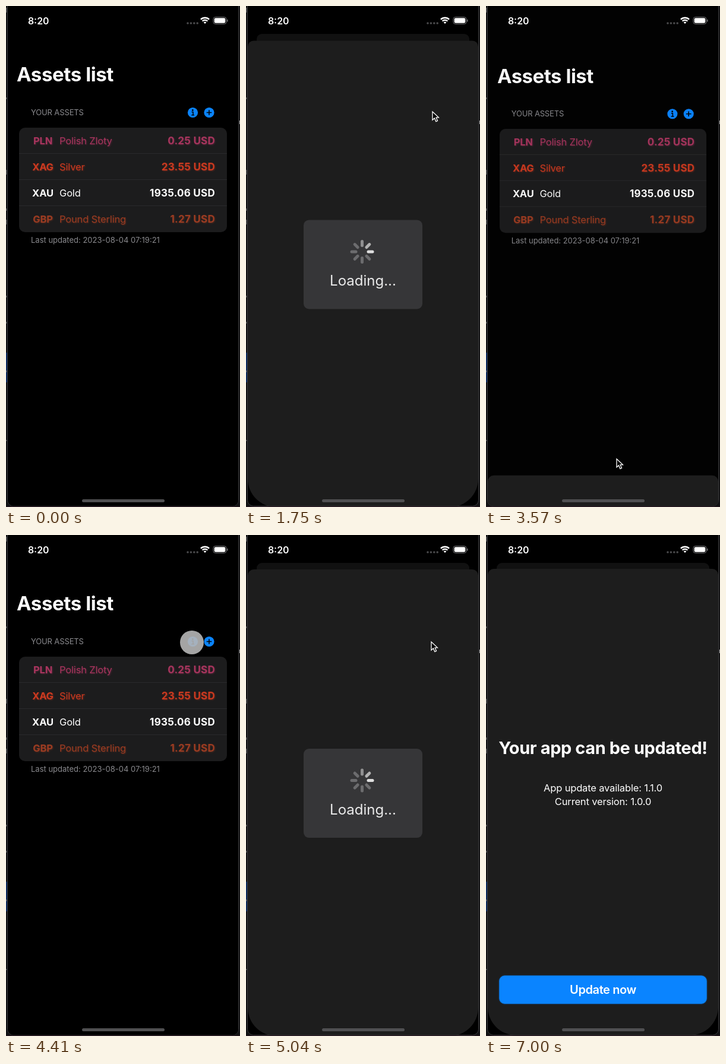
Write an HTML page that moves like this. It is 394 by 844 pixels and loops after 8000 ms.

```html
<!DOCTYPE html>
<html lang="en">
<head>
<meta charset="utf-8">
<title>Assets list</title>
<style>
  html, body { margin: 0; width: 100%; height: 100%; overflow: hidden; background: #000; }
  svg { display: block; width: 394px; height: 844px; }
  text { font-family: Inter, "Liberation Sans", sans-serif; fill: #fff; white-space: pre; }
  .title { font-size: 33px; font-weight: 700; letter-spacing: -.0125em; }
  .note { font-size: 13px; fill: #8a8a8e; }
  .body { font-size: 16.5px; letter-spacing: -.01em; }
  .code { font-size: 16.5px; font-weight: 700; letter-spacing: -.01em; }
  .price { font-size: 17px; font-weight: 700; letter-spacing: .015em; }
  .button { font-size: 20px; font-weight: 600; letter-spacing: -.02em; }
  .mid { text-anchor: middle; }
  .end { text-anchor: end; }
  #press { fill: #0a84ff; filter: drop-shadow(0 .5px 1px #0a84ff88); }
  #touch { fill: #c8c8c8; fill-opacity: .82; filter: drop-shadow(0 0 1px #0008); }
</style>
</head>
<body>
<svg viewBox="0 0 394 844">
  <clipPath id="screen"><rect x="3" y="-20" width="388.5" height="862.5" rx="10"/></clipPath>

  <!-- desktop behind the phone -->
  <rect width="394" height="844" fill="#121214"/>
  <rect y="584" width="3" height="50" fill="#0c2a5e"/>
  <path d="M.5 3v8M.5 154v3M.5 276v8M.5 341v4M.5 360v8M.5 488v3M.5 532v3M.5 614v3M.5 731v2" stroke="#666" stroke-width="1.5"/>
  <path d="M393.5 193v6" stroke="#bbb"/>
  <rect y="843" width="394" height="1" fill="#2a1620"/>
  <rect x="2.5" y="-20" width="389" height="862.5" rx="10" fill="#000" stroke="#3a3a3c"/>

  <g clip-path="url(#screen)">
    <g id="base">
      <rect id="back" x="3" width="388" height="844" rx="10"/>
      <text class="title" x="18" y="127">Assets list</text>
      <text class="note" x="42" y="184" letter-spacing="-.13">YOUR ASSETS</text>
      <circle id="info" cx="314.5" cy="179.5" r="8.6"/>
      <circle id="plus" cx="342" cy="179.5" r="8.6"/>
      <circle cx="314.3" cy="175.5" r="1.4"/>
      <path d="M312.5 178.6H315V183.6M312.3 183.8H317" fill="none" stroke="#000" stroke-width="1.5"/>
      <path d="M337.7 179.5H346.3M342 175.2V183.8" stroke="#000" stroke-width="1.6"/>
      <rect x="22" y="205" width="350" height="176" rx="10" fill="#1c1c1d"/>
      <path d="M22 248.5H372M22 292.5H372M22 336.5H372" stroke="#2a2a2c"/>
      <g id="rows"></g>
      <text class="note" x="42" y="399">Last updated: 2023-08-04 07:19:21</text>
      <rect id="dim" x="3" width="388" height="844" rx="10"/>
    </g>

    <g id="sheet">
      <path d="M3 844V67a10 10 0 0 1 10-10H381a10 10 0 0 1 10 10V795a48 48 0 0 1-48 48H51a48 48 0 0 1-48-48Z" fill="#1d1d1d"/>
      <g id="loading">
        <rect x="97" y="359" width="200" height="150" rx="9" fill="#363638"/>
        <g id="spinner" transform="translate(195.5 412.5)" stroke-width="5" stroke-linecap="round"></g>
        <text class="mid" x="197" y="470" font-size="24" style="fill:#ebebeb">Loading...</text>
      </g>
      <g id="result">
        <text id="head" class="title mid" x="197"></text>
        <text id="line1" class="body mid" x="197" y="432">App update available: 1.1.0</text>
        <text id="line2" class="body mid" x="197">Current version: 1.0.0</text>
        <rect id="press" x="22.3" y="742.3" width="349.4" height="47.4" rx="9"/>
        <text id="action" class="button mid" x="197" y="773"></text>
      </g>
    </g>
  </g>

  <!-- status bar and home indicator -->
  <text x="37" y="30.5" font-size="15.8" font-weight="600">8:20</text>
  <path d="M306 29h.01M311.4 29h.01M316.8 29h.01M322.2 29h.01" stroke="#4c4c4e" stroke-width="3.6" stroke-linecap="round"/>
  <g fill="none" stroke="#fff" stroke-width="2.3">
    <path d="M327.9 22.6a10.3 10.3 0 0 1 14.2 0M330.6 25.5a6.4 6.4 0 0 1 8.8 0"/>
    <path d="M332.6 27.6a3.4 3.4 0 0 1 4.8 0L335 30Z" fill="#fff" stroke="none"/>
  </g>
  <rect x="349" y="18.6" width="22" height="11.8" rx="3.6" fill="none" stroke="#77777a"/>
  <rect x="350.7" y="20.3" width="18.6" height="8.4" rx="2.2" fill="#fff"/>
  <path d="M372.8 22.8v3.6" stroke="#77777a" stroke-width="1.4"/>
  <rect x="128" y="831" width="139" height="5" rx="2.5" fill="#505052"/>

  <circle id="touch" r="20"/>
  <path id="cursor" d="M0 0V14L3.4 10.9L5.9 16.6L8.5 15.5L6.1 9.9H10.4Z" fill="#000" stroke="#fff" stroke-width="1.3"/>
</svg>
<script>
const $ = id => document.getElementById(id);
const LOOP = 8000, STEP = 70, RATE = 17.5, TRAVEL = 787;
const BLUE = '#0a84ff';

const assets = [
  ['PLN', 'Polish Zloty', '0.25', '#a8355e'],
  ['XAG', 'Silver', '23.55', '#cc3a20'],
  ['XAU', 'Gold', '1935.06', '#ffffff'],
  ['GBP', 'Pound Sterling', '1.27', '#9c3c22'],
];
$('rows').innerHTML = assets.map(([code, name, price, color], i) => {
  const y = 233 + 44 * i;
  const glow = color === '#ffffff' ? '' : `;filter:drop-shadow(1px 1px 1px ${color}66)`;
  const text = (cls, x, s) => `<text class="${cls}" x="${x}" y="${y}" style="fill:${color}${glow}">${s}</text>`;
  return text('code mid', 62, code) + text('body', 90, name) + text('price end', 352, price + ' USD');
}).join('');

$('spinner').innerHTML = [0, 1, 2, 3, 4, 5, 6, 7].map(i =>
  `<path d="M10.5 0H17.5" transform="rotate(${45 * i})"/>`).join('');
const spokes = [...$('spinner').children];
const shades = ['#dedede', '#b2b2b2', '#8f8f90'];

// [from, to, x, y]
const touches = [[1120, 1260, 315, 180], [3220, 3360, 221, 765], [4410, 4530, 313, 181]];
const cursors = [[840, 1120, 314, 178], [1260, 2450, 314, 178], [3360, 3710, 220, 763], [4530, 5950, 312, 180]];

// sheet visits: opening, result shown, closing
const visits = [
  { open: 1260, ready: 1960, close: 3320, head: 'Your app is up to date!', size: 33, y: 381, line: 446, action: 'Go back' },
  { open: 4530, ready: 5460, close: Infinity, head: 'Your app can be updated!', size: 28.9, y: 369, line: 454.5, action: 'Update now' },
];

const remaining = ms => {
  const x = RATE * Math.max(0, ms) / 1000;
  return (1 + x) * Math.exp(-x);
};
const show = (el, on) => { el.style.display = on ? '' : 'none'; };

function place(el, spans, t) {
  const span = spans.find(([from, to]) => t >= from && t < to);
  show(el, span);
  if (span) el.setAttribute('transform', `translate(${span[2]} ${span[3]})`);
}

function drawSheet(v, t) {
  const loading = t < v.ready;
  show($('loading'), loading);
  show($('result'), !loading);
  // the bright spoke points right about half a second after opening
  const lead = Math.floor((t - v.open - 475) / 125);
  spokes.forEach((s, i) => s.setAttribute('stroke', shades[(lead - i + 16) % 8] || '#6c6c6e'));
  $('head').textContent = v.head;
  $('head').style.fontSize = v.size + 'px';
  $('head').setAttribute('y', v.y);
  show($('line1'), v.action === 'Update now');
  $('line2').setAttribute('y', v.line);
  $('action').textContent = v.action;
}

function draw(now) {
  const t = Math.floor(now % LOOP / STEP) * STEP;
  const v = visits.filter(v => t >= v.open).pop();
  const closing = v && t >= v.close;
  const open = v && !closing;
  let p = 0;
  if (v) p = closing ? remaining(t - v.close) : 1 - remaining(t - v.open);
  if (closing && t > 3920) p = 0;

  $('base').setAttribute('transform',
    `translate(197 ${47 * p}) scale(${1 - 0.077 * p}) translate(-197 0)`);
  const g = Math.round(28 * p);
  $('back').setAttribute('fill', `rgb(${g},${g},${g})`);
  $('dim').setAttribute('opacity', open ? 0.28 + 0.12 * p : 0.4 * p);
  $('info').setAttribute('fill', open ? '#161618' : BLUE);
  $('plus').setAttribute('fill', open ? '#333335' : BLUE);

  show($('sheet'), p > 0);
  $('sheet').setAttribute('transform', `translate(0 ${TRAVEL * (1 - p)})`);
  if (v) drawSheet(v, t);
  place($('touch'), touches, t);
  place($('cursor'), cursors, t);
}

const start = performance.now();
function tick() {
  draw(performance.now() - start);
  requestAnimationFrame(tick);
}
tick();
</script>
</body>
</html>
```
